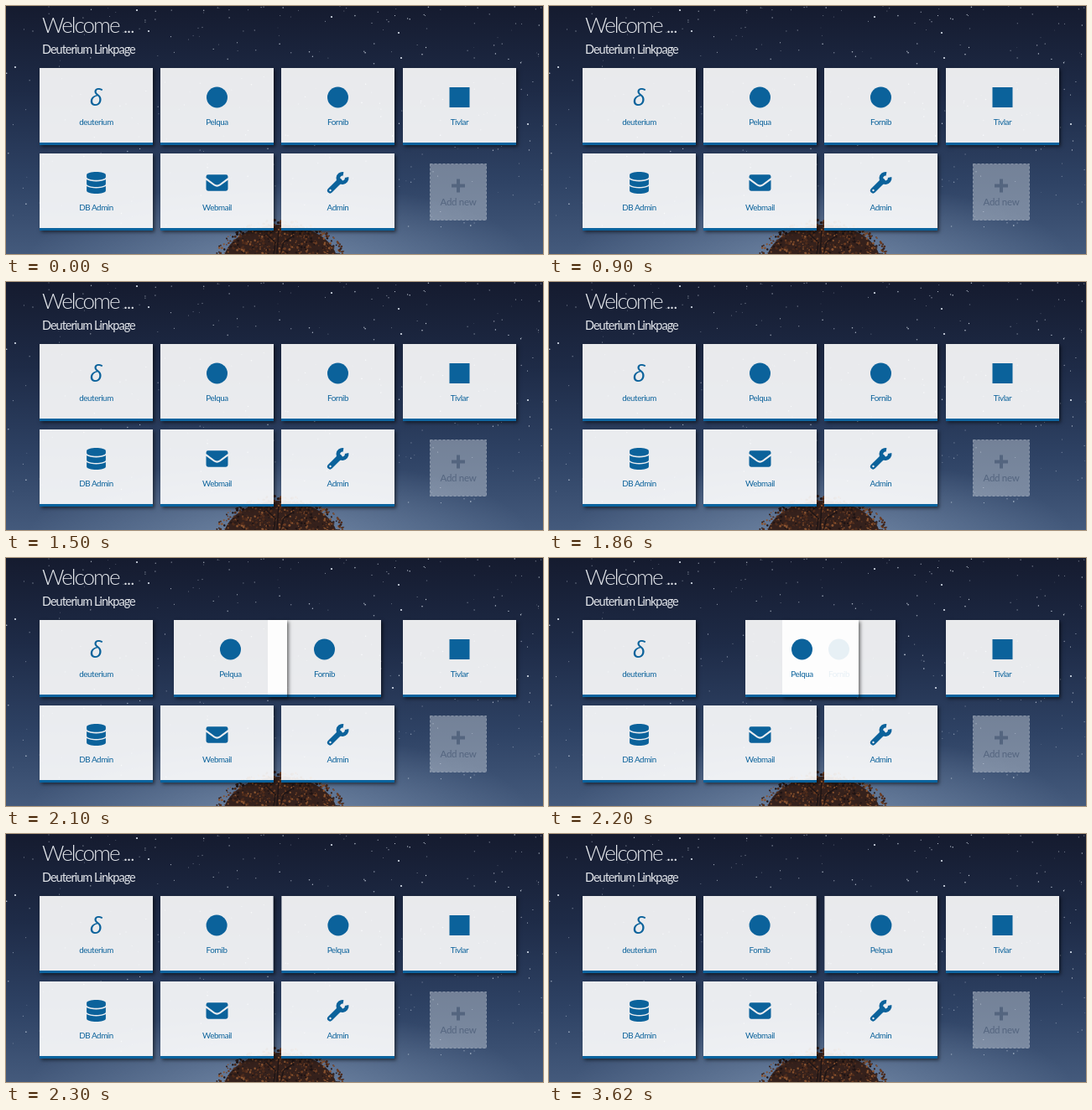
Write an HTML page that moves like this. It is 640 px wide and 296 px high and loops after 4.5 s.

```html
<!DOCTYPE html>
<html lang="en">
<head>
<meta charset="utf-8">
<title>Deuterium Linkpage</title>
<style>
  html, body { margin: 0; width: 100%; height: 100%; overflow: hidden; background: #1b2540; }
  #stage { position: relative; width: 640px; height: 296px; overflow: hidden; }
  svg { position: absolute; left: 0; top: 0; display: block; overflow: visible; }
  text { font-family: Lato, "Open Sans", sans-serif; }
  .card {
    position: absolute; box-sizing: border-box; width: 135px; height: 92px;
    background: rgba(255, 255, 255, .9); background-clip: padding-box;
    border-bottom: 3px solid #0a639e;
    box-shadow: 2px 2px 4px rgba(0, 0, 0, .55);
  }
  .card svg { fill: #0b629b; }
  .label { font-size: 9.8px; letter-spacing: -.4px; text-anchor: middle; }
  .delta { font: italic 28px "Open Sans", "Noto Sans", sans-serif; text-anchor: middle; }
</style>
</head>
<body>
<div id="stage">
  <svg width="640" height="296" viewBox="0 0 640 296">
    <defs>
      <linearGradient id="sky" x1="0" y1="0" x2="0" y2="1">
        <stop offset="0" stop-color="#151b2f"/>
        <stop offset=".35" stop-color="#1e2b47"/>
        <stop offset=".7" stop-color="#2e4264"/>
        <stop offset="1" stop-color="#445a7c"/>
      </linearGradient>
      <radialGradient id="glow" gradientUnits="userSpaceOnUse" cx="0" cy="0" r="1"
        gradientTransform="translate(325 306) scale(300 95)">
        <stop offset="0" stop-color="#8ea4c0" stop-opacity=".6"/>
        <stop offset="1" stop-color="#8ea4c0" stop-opacity="0"/>
      </radialGradient>
    </defs>
    <rect width="640" height="296" fill="url(#sky)"/>
    <rect width="640" height="296" fill="url(#glow)"/>
    <g id="stars" fill="#e6eef8"></g>
    <g id="tree"></g>
    <g fill="#e3e6eb">
      <text x="43" y="32" font-size="26" font-weight="300" letter-spacing="-2">Welcome ...</text>
      <text x="43" y="56.5" font-size="14.5" letter-spacing="-1">Deuterium Linkpage</text>
    </g>
    <rect x="505.5" y="188.5" width="67" height="67" fill="#c3cad6" fill-opacity=".48"
      stroke="#b4bdcb" stroke-opacity=".55" stroke-dasharray="3 2"/>
    <g fill="#54657f">
      <path d="M537 206.5h4v6h6v4h-6v6h-4v-6h-6v-4h6z"/>
      <text x="539" y="238" font-size="11.5" letter-spacing="-.3" text-anchor="middle">Add new</text>
    </g>
  </svg>
</div>
<script>
const LOOP = 4500;
const STEP = 144.4;
const stage = document.getElementById('stage');

const disc = '<circle r="12.5"/>';
const square = '<rect x="-12" y="-12" width="24" height="24"/>';
const delta = '<text class="delta" y="10">δ</text>';
const layer = 'M-11.4-4C-7-.7 7-.7 11.4-4V1.2C11.4 6.2-11.4 6.2-11.4 1.2Z';
const database =
  '<path d="M-11.4-9.3C-11.4-14.2 11.4-14.2 11.4-9.3V-7C11.4-2-11.4-2-11.4-7Z"/>' +
  `<path d="${layer}"/><path d="${layer}" transform="translate(0 8.1)"/>`;
const envelope =
  '<path d="M-13-3.2L-4 3.3Q0 6.2 4 3.3L13-3.2V7.3Q13 9.7 10.6 9.7H-10.6Q-13 9.7-13 7.3Z"/>' +
  '<path d="M-10.6-9.7H10.6Q13-9.7 13-7.3V-6L3 1.5Q0 3.6-3 1.5L-13-6V-7.3Q-13-9.7-10.6-9.7Z"/>';
const wrench =
  '<g fill="none" stroke="#0b629b"><path d="M-9.3 9.3L2-2" stroke-width="6.5" stroke-linecap="round"/>' +
  '<path d="M6.5-10.6A5.2 5.2 0 1 0 10.6-6.5" stroke-width="4.6"/></g>' +
  '<circle cx="-9" cy="9" r="1.2" fill="#ebedf0"/>';

function addCard(col, row, name, icon) {
  const card = document.createElement('div');
  card.className = 'card';
  card.style.left = 39.5 + col * STEP + 'px';
  card.style.top = 74 + row * 102 + 'px';
  card.innerHTML = `<svg width="135" height="89"><g transform="translate(67.5 35)">${icon}</g>` +
    `<text class="label" x="67.5" y="68">${name}</text></svg>`;
  stage.appendChild(card);
  return card;
}

addCard(0, 0, 'deuterium', delta);
const dragged = addCard(1, 0, 'Pelqua', disc);
const pushed = addCard(2, 0, 'Fornib', disc);
addCard(3, 0, 'Tivlar', square);
addCard(0, 1, 'DB Admin', database);
addCard(1, 1, 'Webmail', envelope);
addCard(2, 1, 'Admin', wrench);
dragged.style.zIndex = 1;

let seed = 41;
function rand() {
  seed = (seed * 16807) % 2147483647;
  return seed / 2147483647;
}

function drawStars() {
  const star = (x, y, r, o) =>
    `<circle cx="${x.toFixed(1)}" cy="${y.toFixed(1)}" r="${r.toFixed(2)}" opacity="${o.toFixed(2)}"/>`;
  const bright = [[156, 5], [170, 30], [468, 32], [471, 62], [461, 155], [622, 141], [388, 13], [11, 73]];
  let out = bright.map(([x, y]) => star(x, y, 1.1, .95)).join('');
  for (let i = 0; i < 300; i++) {
    out += star(640 * rand() ** .85, 270 * rand() ** 1.3, .4 + rand() * .4, .3 + rand() * .6);
  }
  document.getElementById('stars').innerHTML = out;
}

function drawTree() {
  const tones = ['#1f1414', '#35201a', '#4f2c1c', '#6b3c22', '#8a5430'];
  let out = '<ellipse cx="327" cy="306" rx="68" ry="45" fill="#35211c"/>';
  for (let i = 0; i < 750; i++) {
    const a = Math.PI * (1 + rand());
    const d = Math.sqrt(rand());
    const x = 327 + 79 * d * Math.cos(a);
    const y = 307 + 52 * d * Math.sin(a);
    const tone = tones[Math.floor(rand() * tones.length)];
    out += `<circle cx="${x.toFixed(1)}" cy="${y.toFixed(1)}" r="${(.6 + rand()).toFixed(1)}" fill="${tone}"/>`;
  }
  out += '<path d="M319 296L321 282L310 272M323 296L325 268M327 296L331 282L343 274" ' +
    'fill="none" stroke="#1d1415" stroke-width="1.5"/>';
  document.getElementById('tree').innerHTML = out;
}

// The swap happens in three hard steps.
function offset(t) {
  if (t < 2100) return 0;
  if (t < 2200) return 16;
  if (t < 2300) return 50;
  return STEP;
}

function render(t) {
  const dx = offset(t);
  dragged.style.transform = `translateX(${dx}px)`;
  pushed.style.transform = `translateX(${-dx}px)`;
}

drawStars();
drawTree();
render(0);
const start = performance.now();
function tick() {
  render((performance.now() - start) % LOOP);
  requestAnimationFrame(tick);
}
requestAnimationFrame(tick);
</script>
</body>
</html>
```
